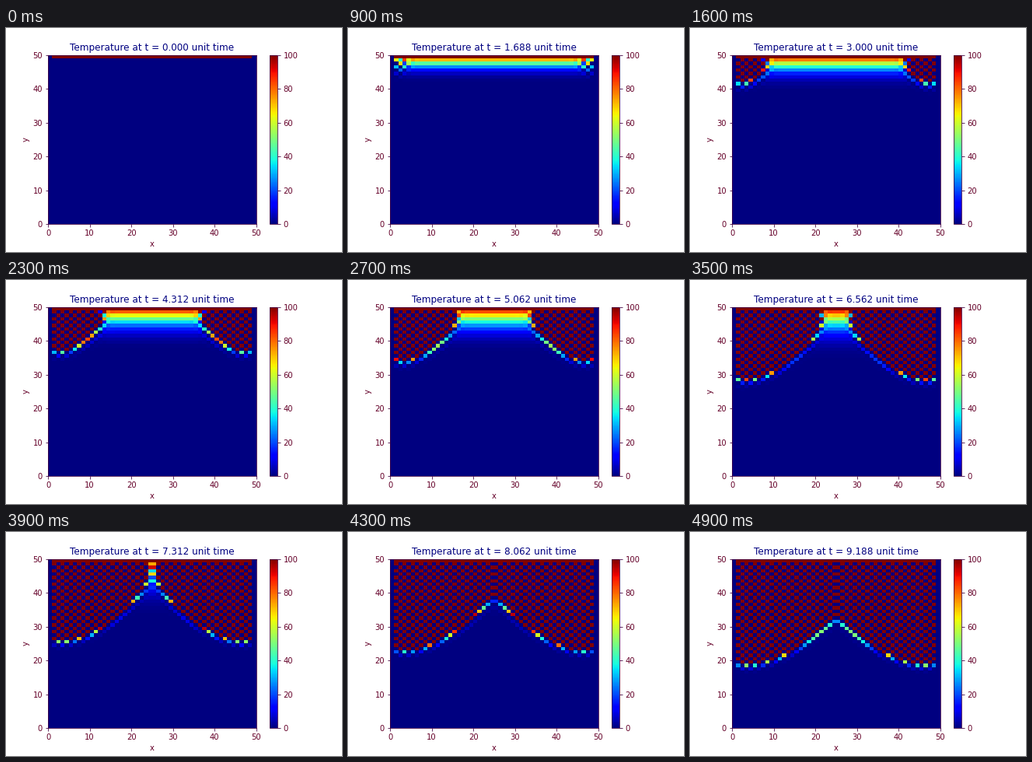
Recreate the animation shown at these times as a matplotlib script. Size 432 by 288 pixels, loop 5 s.

```python
import numpy as np
import matplotlib.pyplot as plt
from matplotlib.animation import FuncAnimation

SIZE = 50
STEPS = 50
ALPHA = 2
DELTA_T = 0.1875
GAMMA = ALPHA * DELTA_T  # above 0.25, so the explicit scheme is unstable
NAVY, MAROON, EDGE = "#000080", "#640028", "#400040"

plt.rcParams.update({
    "font.family": "DejaVu Sans",
    "font.size": 10,
    "axes.titlesize": 12,
    "axes.titlecolor": NAVY,
    "axes.labelcolor": MAROON,
    "axes.edgecolor": EDGE,
    "xtick.color": EDGE,
    "ytick.color": EDGE,
    "xtick.labelcolor": MAROON,
    "ytick.labelcolor": MAROON,
    "figure.subplot.left": 0.125,
    "figure.subplot.right": 0.9,
    "figure.subplot.bottom": 0.125,
    "figure.subplot.top": 0.88,
})


def solve_heat():
    """Explicit finite differences with a hot top edge and cold sides."""
    u = np.zeros((STEPS, SIZE, SIZE))
    u[:, -1, 1:-1] = 100
    for k in range(STEPS - 1):
        now = u[k]
        mid = now[1:-1, 1:-1]
        neighbours = (now[2:, 1:-1] + now[:-2, 1:-1]
                      + now[1:-1, 2:] + now[1:-1, :-2])
        u[k + 1, 1:-1, 1:-1] = GAMMA * (neighbours - 4 * mid) + mid
    return u


heat = solve_heat()

fig, ax = plt.subplots(figsize=(6, 4), dpi=72, facecolor="white")
mesh = ax.pcolormesh(heat[0], cmap="jet", vmin=0, vmax=100)
ax.set_xlabel("x")
ax.set_ylabel("y")
ax.set_xticks(range(0, 51, 10))
ax.set_yticks(range(0, 51, 10))
title = ax.set_title("")
bar = fig.colorbar(mesh, ax=ax, ticks=range(0, 101, 20))
bar.outline.set_edgecolor(EDGE)


def draw(k):
    mesh.set_array(heat[k])
    title.set_text(f"Temperature at t = {k * DELTA_T:.3f} unit time")
    return mesh, title


anim = FuncAnimation(fig, draw, frames=STEPS, interval=100,
                     repeat=True, repeat_delay=0)
plt.show()
```
